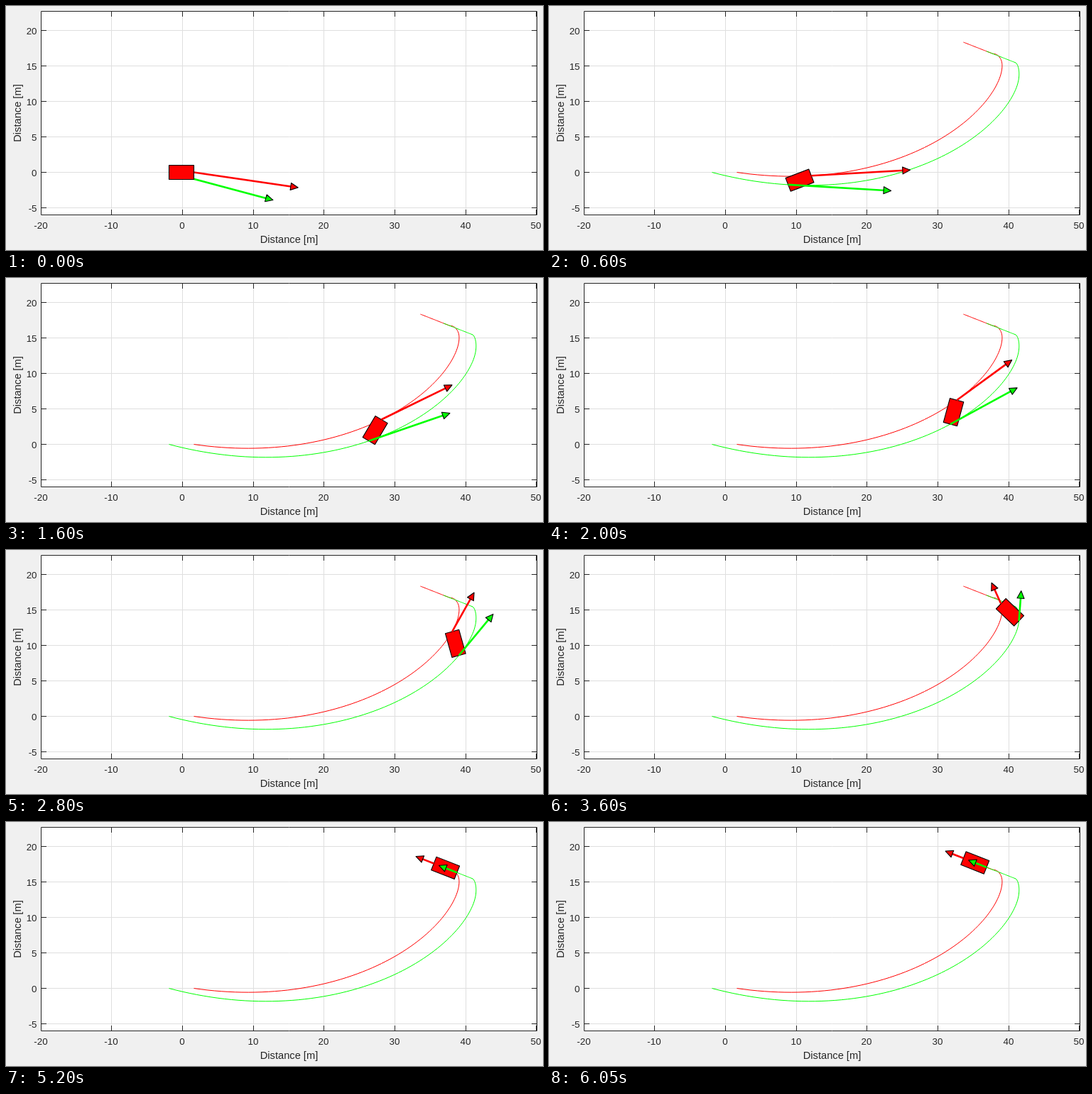
Write an HTML page with a canvas that moves like this. It is 756 by 344 pixels and loops after 6.1 s.

```html
<!DOCTYPE html>
<html lang="en">
<head>
<meta charset="utf-8">
<title>Vehicle trajectory</title>
<style>
  html, body { margin: 0; width: 100%; height: 100%; overflow: hidden; background: #f0f0f0; }
  canvas { display: block; }
</style>
</head>
<body>
<canvas id="stage" width="756" height="344"></canvas>
<script>
const ctx = document.getElementById('stage').getContext('2d');
const RED = '#f00', GREEN = '#0f0', INK = '#262626';
const FONT = '"Liberation Sans", Arial, sans-serif';
const STEP = 50, STEPS = 122;
const HALF_LENGTH = 17.5, HALF_WIDTH = 10;
const TURN = 1.92 * Math.PI / 180, END_HEADING = 158.5 * Math.PI / 180;
const GRIP_FROM = 71, STRAIGHT_FROM = 83;
const EXIT = { x: 393.8, y: 160.9, vx: -1.11, vy: 0.437 };

// Sliding turn: constant yaw rate and constant sideways acceleration.
function slide(m) {
  const a = TURN * m, settle = 1 - Math.exp(-m / 12);
  return {
    x: 3.98 * m + 174.3 * Math.sin(a) - settle,
    y: -2.195 * m + 174.3 * (1 - Math.cos(a)) + 2.2 * settle
  };
}

function hermite(p, v, q, w, span, u) {
  const u2 = u * u, u3 = u2 * u;
  return p * (2 * u3 - 3 * u2 + 1) + v * span * (u3 - 2 * u2 + u) +
         q * (3 * u2 - 2 * u3) + w * span * (u3 - u2);
}

// Centre of the car relative to its start, y upwards.
function centre(m) {
  if (m <= GRIP_FROM) return slide(m);
  if (m >= STRAIGHT_FROM) {
    const d = m - STRAIGHT_FROM;
    return { x: EXIT.x + EXIT.vx * d, y: EXIT.y + EXIT.vy * d };
  }
  const span = STRAIGHT_FROM - GRIP_FROM, u = (m - GRIP_FROM) / span;
  const p = slide(GRIP_FROM);
  return {
    x: hermite(p.x, -0.24, EXIT.x, EXIT.vx, span, u),
    y: hermite(p.y, 1.84, EXIT.y, EXIT.vy, span, u)
  };
}

const heading = m => Math.min(TURN * m, END_HEADING);

// side: 1 = front axle, -1 = rear axle, 0 = centre; in pixels.
function point(m, side) {
  const c = centre(m), a = heading(m), r = side * HALF_LENGTH;
  return { x: 247 + c.x + r * Math.cos(a), y: 234.5 - c.y - r * Math.sin(a) };
}

function line(x1, y1, x2, y2) {
  ctx.beginPath();
  ctx.moveTo(x1, y1);
  ctx.lineTo(x2, y2);
  ctx.stroke();
}

function text(str, x, y, size, align) {
  ctx.font = size + 'px ' + FONT;
  ctx.textAlign = align;
  ctx.fillText(str, x, y);
}

function drawAxes() {
  ctx.fillStyle = '#f0f0f0';
  ctx.fillRect(0, 0, 756, 344);
  ctx.fillStyle = '#fff';
  ctx.fillRect(49, 7, 699, 288);
  ctx.fillStyle = INK;
  ctx.lineWidth = 1;
  const tick = (grid, ticks) => {
    ctx.strokeStyle = '#dfdfdf';
    line(...grid);
    ctx.strokeStyle = INK;
    ticks.forEach(t => line(...t));
  };
  for (let v = -20; v <= 50; v += 10) {
    const x = Math.floor(49 + (v + 20) * 9.971) + 0.5;
    tick([x, 8, x, 294], [[x, 287, x, 294], [x, 8, x, 15]]);
    text(v, x - 0.5, 314, 13.33, 'center');
  }
  for (let v = -5; v <= 20; v += 5) {
    const y = Math.floor(234.4 - v * 9.971) + 0.5;
    tick([50, y, 747, y], [[50, y, 57, y], [740, y, 747, y]]);
    text(v, 43.5, y + 5, 13.33, 'right');
  }
  ctx.strokeRect(49.5, 7.5, 698, 287);
  text('Distance [m]', 398.5, 334, 14.67, 'center');
  ctx.save();
  ctx.translate(21, 151);
  ctx.rotate(-Math.PI / 2);
  text('Distance [m]', 0, 0, 14.67, 'center');
  ctx.restore();
}

function drawTrail(side, color) {
  ctx.beginPath();
  for (let m = 0; m < STEPS - 1; m++) {
    const p = point(m, side);
    ctx.lineTo(p.x, p.y);
  }
  ctx.strokeStyle = color;
  ctx.lineWidth = 1;
  ctx.stroke();
}

function drawCar(m) {
  const c = point(m, 0);
  ctx.save();
  ctx.translate(c.x, c.y);
  ctx.rotate(-heading(m));
  ctx.beginPath();
  ctx.rect(-HALF_LENGTH, -HALF_WIDTH, 2 * HALF_LENGTH, 2 * HALF_WIDTH);
  ctx.fillStyle = RED;
  ctx.fill();
  ctx.strokeStyle = '#000';
  ctx.lineWidth = 1.1;
  ctx.stroke();
  ctx.restore();
}

// Velocity arrow of one axle: shaft proportional to speed plus a fixed head.
function drawArrow(m, side, color) {
  const p = point(m, side), a = point(m - 0.5, side), b = point(m + 0.5, side);
  const dx = b.x - a.x, dy = b.y - a.y, shaft = 14 * Math.hypot(dx, dy);
  ctx.save();
  ctx.translate(p.x, p.y);
  ctx.rotate(Math.atan2(dy, dx));
  ctx.strokeStyle = color;
  ctx.lineWidth = 2.6;
  line(0, 0, shaft + 2, 0);
  ctx.beginPath();
  ctx.moveTo(shaft + 10.5, 0);
  ctx.lineTo(shaft, -5);
  ctx.lineTo(shaft, 5);
  ctx.closePath();
  ctx.fillStyle = color;
  ctx.fill();
  ctx.strokeStyle = '#000';
  ctx.lineWidth = 1.1;
  ctx.stroke();
  ctx.restore();
}

function drawArrows(m) {
  drawArrow(m, 1, RED);
  drawArrow(m, -1, GREEN);
}

function draw(now) {
  const n = Math.floor(now / STEP) % STEPS, m = Math.max(n - 1, 0);
  drawAxes();
  if (n === 0) {
    drawArrows(m);
    drawCar(m);
  } else {
    drawTrail(1, RED);
    drawTrail(-1, GREEN);
    drawCar(m);
    drawArrows(m);
  }
}

ctx.lineJoin = 'round';
const start = performance.now();
function loop() {
  draw(performance.now() - start);
  requestAnimationFrame(loop);
}
loop();
</script>
</body>
</html>
```
